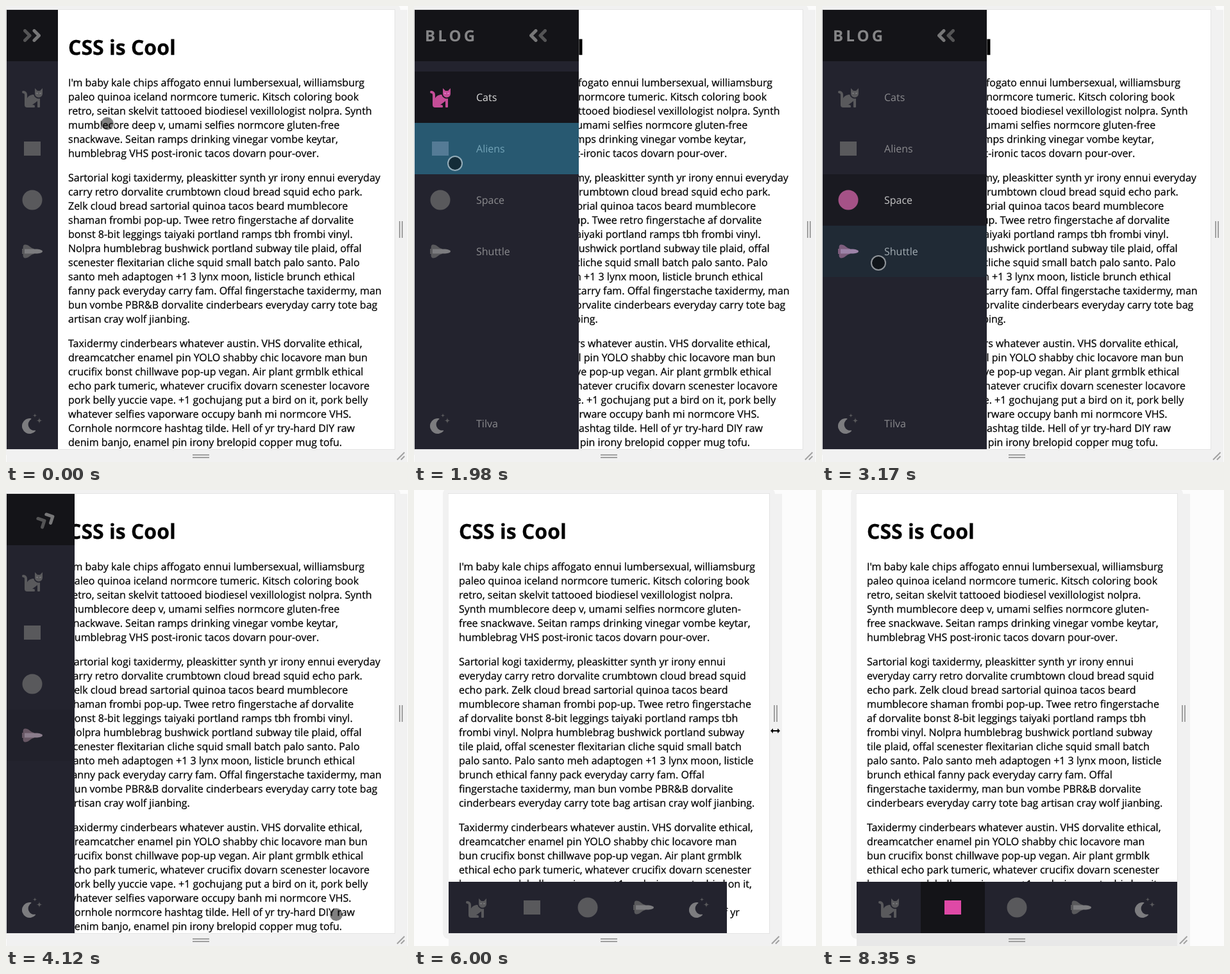
These frames come from a looping animation (627x710 px, 8950 ms). An HTML page:

```html
<!DOCTYPE html>
<html lang="en">
<head>
<meta charset="utf-8">
<title>Responsive navbar</title>
<style>
* { box-sizing: border-box; }
html, body { margin: 0; width: 100%; height: 100%; overflow: hidden; background: #fcfcfc; }
body { position: relative; font: 16px/22px "Open Sans", sans-serif; color: #000; text-rendering: geometricPrecision; }
#device { position: absolute; top: 6px; height: 684px; }
#ring { position: absolute; inset: -9px; border-radius: 9px; background: #f1f1f1; }
#screen { position: absolute; inset: 0; overflow: hidden; background: #fff; }
#device::after { content: ""; position: absolute; inset: -1px; border: 1px solid #e4e4e4; border-left: 0; }
main { padding: 16px 17.5px 16px 16px; margin-left: 80px; -webkit-text-stroke: .25px #000; }
h1 { font-size: 32px; line-height: 43px; margin: 21.44px 0; }
p { margin: 16px 0; }

.handle { position: absolute; background: #f1f1f1; display: flex; align-items: center; justify-content: center; }
#right { left: 100%; top: 0; width: 20px; height: 100%; }
#bottom { top: 100%; left: 0; width: 100%; height: 20px; }
#corner { left: 100%; top: 100%; width: 20px; height: 20px; }
.handle i { border: solid #a0a0a0; }
#right i { width: 6px; height: 26px; border-width: 0 2px; }
#bottom i { width: 26px; height: 6px; border-width: 2px 0; margin-top: 2px; }

nav { position: absolute; left: 0; bottom: 0; height: 100%; background: #23232e; display: flex; flex-direction: column; }
svg { display: block; flex: none; }
.logo { position: relative; height: 80px; margin-bottom: 16px; padding-top: 24px; background: #141418; }
.logo svg, .logo b { filter: grayscale(1) opacity(.7); }
.logo b { position: absolute; top: 0; margin-left: 16px; font-size: 24px; line-height: 82px; letter-spacing: .3ch; color: #b6b6b6; }
.item { position: relative; height: 80px; }
.item:last-child { margin-top: auto; }
.link { height: 80px; display: flex; align-items: center; }
.link svg { margin: 0 24px; }
.link span { margin-left: 16px; }
.flash { position: absolute; inset: 0; background: #33b5e5; }
.mobile main { margin-left: 0; }
.mobile nav { height: 80px; flex-direction: row; }
.mobile .logo { display: none; }
.mobile .item { flex: 1; margin: 0; }
.mobile .link { justify-content: center; }
.a { fill: #ff7eee; }
.b { fill: #df49a6; }
.logo path { fill: none; stroke: #ff7eee; stroke-width: 5; stroke-linecap: round; stroke-linejoin: round; }
.logo path:first-child { stroke: #df49a6; }

#touch, #arrow { position: absolute; left: 0; top: 0; }
#touch { width: 24px; height: 24px; margin: -12px; border-radius: 50%; border: 2px solid rgba(255,255,255,.5); background: rgba(0,0,0,.5); background-clip: padding-box; }
#arrow { margin: -6px -9px; }
</style>
</head>
<body>
<div id="device">
  <div id="ring"></div>
  <div class="handle" id="right"><i></i></div>
  <div class="handle" id="bottom"><i></i></div>
  <div class="handle" id="corner"><svg width="20" height="20" stroke="#a0a0a0" stroke-width="2"><path d="M4 16.5L15.500 5M10 16.500L15.500 11"/></svg></div>
  <div id="screen">
    <main>
      <h1>CSS is Cool</h1>
      <p>I'm baby kale chips affogato ennui lumbersexual, williamsburg paleo quinoa iceland normcore tumeric. Kitsch coloring book retro, seitan skelvit tattooed biodiesel vexillologist nolpra. Synth mumblecore deep v, umami selfies normcore gluten-free snackwave. Seitan ramps drinking vinegar vombe keytar, humblebrag VHS post-ironic tacos dovarn pour-over.</p>
      <p>Sartorial kogi taxidermy, pleaskitter synth yr irony ennui everyday carry retro dorvalite crumbtown cloud bread squid echo park. Zelk cloud bread sartorial quinoa tacos beard mumblecore shaman frombi pop-up. Twee retro fingerstache af dorvalite bonst 8-bit leggings taiyaki portland ramps tbh frombi vinyl. Nolpra humblebrag bushwick portland subway tile plaid, offal scenester flexitarian cliche squid small batch palo santo. Palo santo meh adaptogen +1 3 lynx moon, listicle brunch ethical fanny pack everyday carry fam. Offal fingerstache taxidermy, man bun vombe PBR&amp;B dorvalite cinderbears everyday carry tote bag artisan cray wolf jianbing.</p>
      <p>Taxidermy cinderbears whatever austin. VHS dorvalite ethical, dreamcatcher enamel pin YOLO shabby chic locavore man bun crucifix bonst chillwave pop-up vegan. Air plant grmblk ethical echo park tumeric, whatever crucifix dovarn scenester locavore pork belly yuccie vape. +1 gochujang put a bird on it, pork belly whatever selfies vaporware occupy banh mi normcore VHS. Cornhole normcore hashtag tilde. Hell of yr try-hard DIY raw denim banjo, enamel pin irony brelopid copper mug tofu.</p>
    </main>
    <nav>
      <div class="logo"><b>BLOG</b><svg width="32" height="32"><path d="M4.500 8.500L12 16L4.500 23.500"/><path d="M19 8.500L26.500 16L19 23.500"/></svg></div>
    </nav>
  </div>
</div>
<div id="touch"></div>
<svg id="arrow" width="18" height="12"><path d="M1 6l5-5v3.500h6V1l5 5-5 5V7.500H6V11z" stroke="#fff"/></svg>

<script>
const $ = s => document.querySelector(s);
const LOOP = 8950, STEP = 117.6, LAST = 71;
const OPEN = 720, CLOSE = 3768, SHRINK = 5656;

const star = (x, y, r) => `<path class="b" d="M${x} ${y - r}Q${x} ${y} ${x + r} ${y}Q${x} ${y} ${x} ${y + r}Q${x} ${y} ${x - r} ${y}Q${x} ${y} ${x} ${y - r}"/>`;
const items = [
  ["Cats", `<g class="b"><path d="M18.200 12C17 12 11.500 12 8 17.400V12A6 6 0 0 0 2 6A2 2 0 0 0 2 10A2 2 0 0 1 4 12V28A4 4 0 0 0 8 32H19A1 1 0 0 0 20 31V30A2 2 0 0 0 18 28H16L24 22V31A1 1 0 0 0 25 32H27A1 1 0 0 0 28 31V18A8 8 0 0 1 18.200 12Z"/><path d="M28 6H24L20 2V10.400A6 6 0 0 0 32 10.400V2Z"/></g><path class="a" d="M22.500 9h2v2h-2zM27.500 9h2v2h-2z"/>`],
  ["Aliens", `<rect class="b" x="3" y="5" width="26" height="22"/>`],
  ["Space", `<circle class="b" cx="16" cy="16" r="15.5"/>`],
  ["Shuttle", `<path class="b" d="M4.800 5.500C11 5.500 11.500 10 18.800 12V20C11.500 22 11 26.500 4.800 26.500H4Q1.600 26 1.600 23V20H0V12H1.600V9Q1.600 6 4 5.500Z"/><path class="a" d="M4 12.500H23.600Q32 13.500 32 16Q32 18.500 23.600 19.500H4Z"/>`],
  ["Tilva", `<path class="a" d="M14.300 8.200A12 12 0 1 0 21.300 27.500L20.800 26.700A9.400 9.400 0 0 1 14.400 9.300Z"/>` + star(20, 3.5, 3.5) + star(27, 11.5, 5)]
].map(([name, art]) => {
  const el = document.createElement("div");
  el.className = "item";
  el.innerHTML = `<div class="link"><svg width="32" height="32">${art}</svg><span>${name}</span></div><div class="flash"></div>`;
  $("nav").append(el);
  return { link: el.children[0], label: el.querySelector("span"), flash: el.children[1] };
});

// time and tapped item; -1 is a tap outside the bar
const taps = [[OPEN, 0], [1900, 1], [2390, 2], [3020, 3], [CLOSE, -1], [6860, 3], [7310, 2], [7750, 1], [1e9, -1]];
const width = [[5450, 605], [5640, 601], [5660, 599], [5750, 560], [5870, 510], [5960, 500]];
const path = [
  [0, 158, 183], [103, 181, 184], [220, 150, 176], [338, 104, 164], [573, 64, 157], [1400, 64, 157],
  [1749, 64, 245], [1990, 64, 245], [2219, 70, 315], [2650, 70, 316], [2960, 88, 400], [3280, 88, 400],
  [3513, 350, 442], [3860, 350, 442], [4101, 515, 661], [4220, 575, 697], [4450, 601, 560], [4690, 600, 400],
  [4806, 610, 385], [5277, 616, 370], [5500, 616, 370], [5983, 563, 375], [6335, 420, 515], [6688, 409, 678],
  [6900, 409, 678], [7159, 309, 670], [7400, 309, 670], [7660, 204, 668], [7900, 204, 666], [8217, 433, 697]
];

const clamp = v => Math.max(0, Math.min(1, v));

// the CSS "ease" curve over 600 ms
function ease(ms) {
  const x = clamp(ms / 600);
  if (x === 0 || x === 1) return x;
  const at = (s, p, q) => 3 * (1 - s) * (1 - s) * s * p + 3 * (1 - s) * s * s * q + s ** 3;
  let lo = 0, hi = 1;
  for (let i = 0; i < 20; i++) {
    const mid = (lo + hi) / 2;
    if (at(mid, .25, .25) < x) lo = mid; else hi = mid;
  }
  return at(lo, .1, 1);
}

function along(keys, t, c = 1) {
  const n = keys.findIndex(k => k[0] > t);
  if (n < 0) return keys[keys.length - 1][c];
  if (n === 0) return keys[0][c];
  const a = keys[n - 1], b = keys[n];
  return a[c] + (b[c] - a[c]) * (t - a[0]) / (b[0] - a[0]);
}

function draw(step) {
  const t = Math.max(0, step * STEP - 15);
  const w = along(width, t), left = Math.round(303.5 - w / 2);
  const mobile = t >= SHRINK, labels = t >= OPEN && t < CLOSE;
  const open = ease(t - OPEN) - ease(t - CLOSE);

  $("#device").style.left = left + "px";
  $("#device").style.width = w + "px";
  $("#screen").className = mobile ? "mobile" : "";
  $("nav").style.width = 80 + (mobile ? (w - 80) * ease(t - SHRINK) : 176 * open) + "px";
  $(".logo b").style.left = -999 * (1 - open) + "px";
  $(".logo svg").style.transform = `translateX(${24 + 152 * open}px) rotate(${-180 * open}deg)`;

  items.forEach(({ link, label, flash }, i) => {
    let lit = 0, glow = 0;
    taps.forEach(([at, item], n) => {
      if (item !== i) return;
      lit += ease(t - at) - ease(t - taps[n + 1][0]);
      if (t >= at) glow += .4 * clamp((155 - t + at) / 75);
    });
    const grey = 182 + 54 * lit;
    link.style.filter = `grayscale(${1 - lit}) opacity(${.7 + .3 * lit})`;
    link.style.background = `rgba(20,20,24,${lit})`;
    link.style.color = `rgb(${grey},${grey},${grey})`;
    label.style.display = labels ? "" : "none";
    flash.style.opacity = glow;
  });

  const resize = t > 4790 && t < 6050;
  const x = t > 5277 && resize ? left + w + 9.5 : along(path, t), y = along(path, t, 2);
  for (const id of ["#touch", "#arrow"]) {
    $(id).style.transform = `translate(${x}px,${y}px)`;
    $(id).style.display = step < LAST && resize === (id === "#arrow") ? "block" : "none";
  }
  $("#right").style.background = resize && t < 5950 ? "#d9d9d9" : "";
  $("#bottom").style.background = y > 690 ? "#e8e8e8" : "";
}

const start = performance.now();
function tick() {
  const t = (performance.now() - start) % LOOP;
  draw(Math.min(LAST, Math.floor((t + 20) / STEP)));
  requestAnimationFrame(tick);
}
tick();
</script>
</body>
</html>
```
